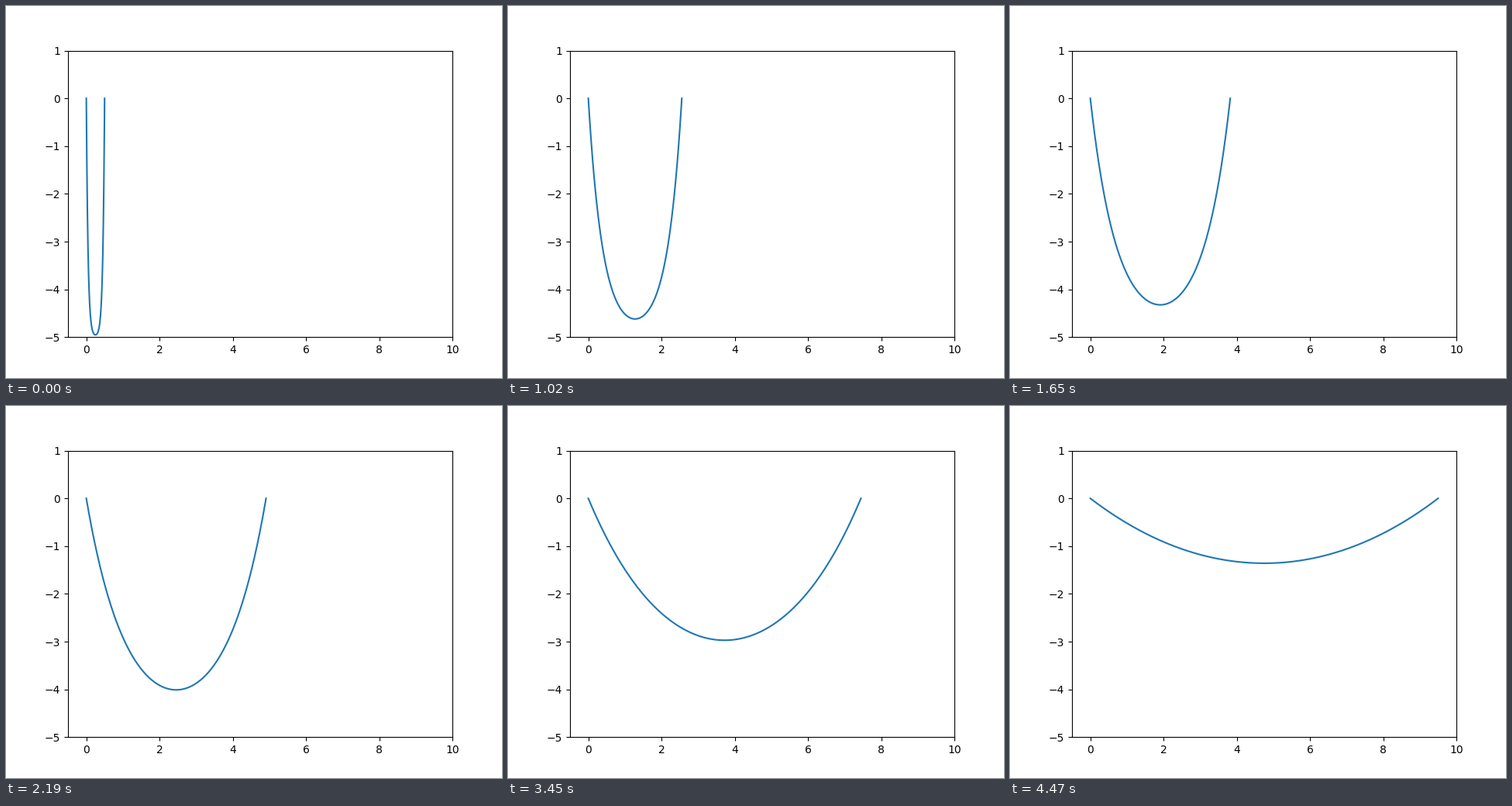
Animation, 640 px wide and 480 px high, one loop 4500 ms. Source, as a matplotlib script:

```python
import numpy as np
import matplotlib.pyplot as plt
from matplotlib.animation import FuncAnimation

LENGTH = 10.0
FRAMES = 150
SPANS = np.linspace(0.5, 9.5, FRAMES)


def solve_half_angle(span):
    """Solve sinh(u) / u = LENGTH / span by bisection."""
    low, high = 1e-6, 20.0
    for _ in range(60):
        mid = (low + high) / 2
        if np.sinh(mid) / mid < LENGTH / span:
            low = mid
        else:
            high = mid
    return (low + high) / 2


def catenary(span, points=200):
    """Rope of fixed length hanging between (0, 0) and (span, 0)."""
    u = solve_half_angle(span)
    a = span / (2 * u)
    x = np.linspace(0, span, points)
    y = a * (np.cosh((x - span / 2) / a) - np.cosh(u))
    return x, y


fig, ax = plt.subplots(figsize=(6.4, 4.8), dpi=100)
ax.set_xlim(-0.5, 10)
ax.set_ylim(-5, 1)
rope, = ax.plot([], [])


def update(frame):
    rope.set_data(*catenary(SPANS[frame]))
    return rope,


anim = FuncAnimation(fig, update, frames=FRAMES, interval=30, repeat=True)
plt.show()
```
